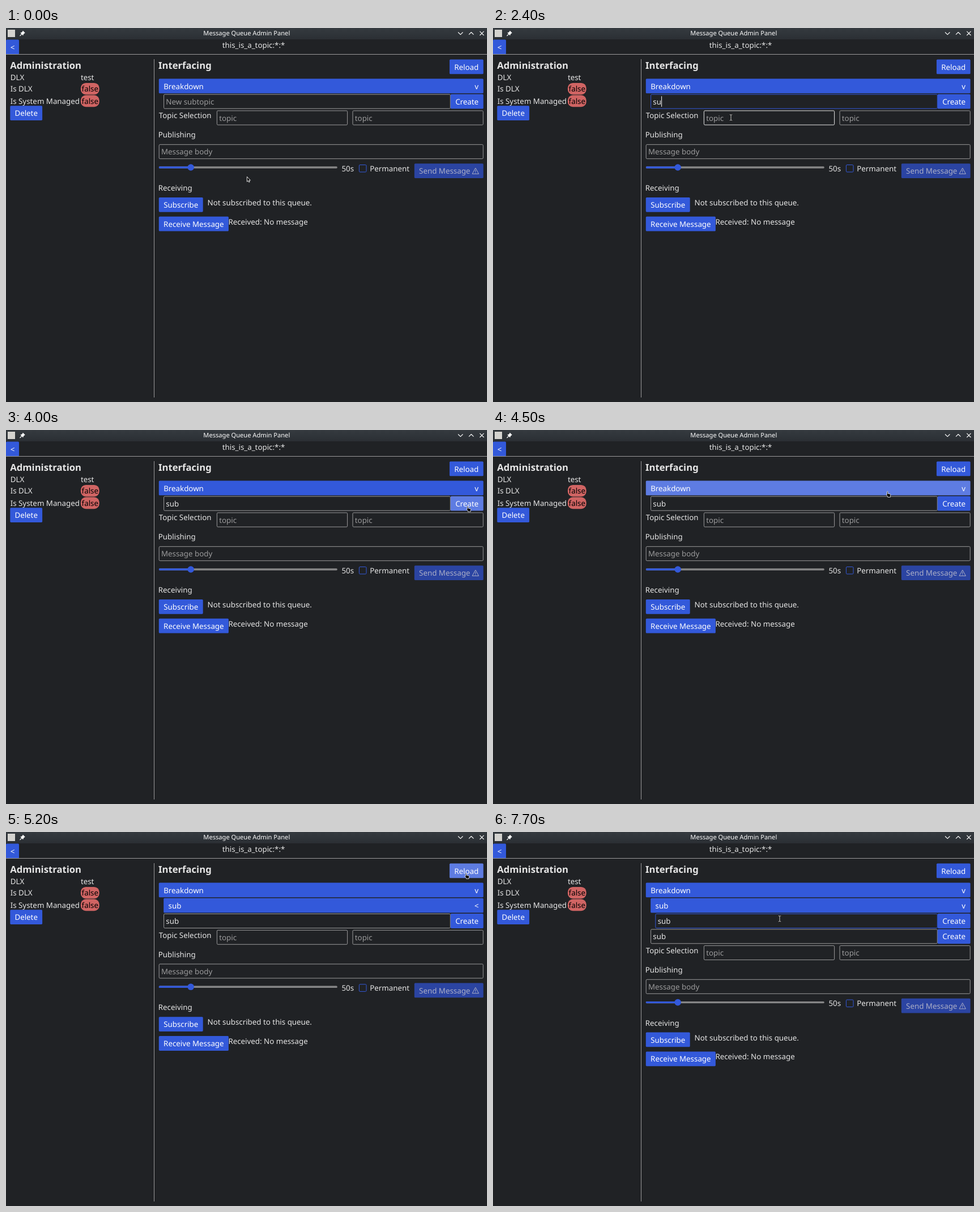
Recreate the animation shown at these times as an HTML page. Size 849x660 px, loop 8 s.

```html
<!DOCTYPE html>
<html lang="en">
<head>
<meta charset="utf-8">
<title>Message Queue Admin Panel</title>
<style>
  html, body { margin: 0; width: 100%; height: 100%; overflow: hidden; background: #202225; }
  svg { display: block; width: 849px; height: 660px; }
  text { font: 13.333px "Noto Sans", sans-serif; fill: #e6e6e6; text-rendering: geometricPrecision; white-space: pre; }
  text.title { font-size: 11.11px; fill: #fcfcfc; }
  text.head { font-size: 16.667px; font-weight: 700; }
  text.on { fill: #fff; }
  text.off { fill: #abaec6; }
  text.hint { fill: #9a9a9b; }
  text.dark { fill: #000; }
</style>
</head>
<body>
<svg id="stage" viewBox="0 0 849 660"></svg>
<script>
const LOOP = 8000, STEP = 100;
const BLUE = '#3359da', LIGHT = '#5e7ce2', GREY = '#9a9a9b', BG = '#202225';
const LEFT = 269.8, RIGHT = 842.6, ROW_H = 25.8, PITCH = 27.3;
const CREATE_X = 784.7;

// Pointer path: time, x, y
const PATH = [
  [100, 425, 262], [700, 368.5, 122], [1500, 368.5, 122], [1800, 420, 158],
  [2900, 420, 158], [3000, 470, 165], [3200, 640, 178], [3400, 812, 148],
  [3700, 815, 134], [4300, 815, 134], [4500, 696.3, 108.3], [4800, 740, 95],
  [5100, 812, 72.3], [5300, 812, 72.3], [5800, 588.4, 127], [6600, 588.4, 127],
  [7100, 506, 153]
];

function pointerAt(t) {
  let a = PATH[0];
  for (const b of PATH) {
    if (t < b[0]) {
      const k = Math.max(0, (t - a[0]) / (b[0] - a[0] || 1));
      return { x: a[1] + (b[1] - a[1]) * k, y: a[2] + (b[2] - a[2]) * k };
    }
    a = b;
  }
  return { x: a[1], y: a[2] };
}

const rect = (x, y, w, h, fill, r = 1.67, extra = '') =>
  `<rect x="${x}" y="${y}" width="${w}" height="${h}" rx="${r}" fill="${fill}" ${extra}/>`;
const path = (d, stroke, w = 1, fill = 'none') =>
  `<path d="${d}" stroke="${stroke}" stroke-width="${w}" fill="${fill}" stroke-linejoin="round"/>`;
const text = (x, y, s, cls = '', anchor = 'start') =>
  `<text x="${x}" y="${y}" class="${cls}" text-anchor="${anchor}">${s.replace('<', '&lt;')}</text>`;

let mouse, shape, pressed;

function over(x, y, w, h, kind) {
  const hit = mouse.x >= x && mouse.x < x + w && mouse.y >= y && mouse.y < y + h;
  if (hit) shape = kind;
  return hit;
}

function button(x, y, w, label) {
  const hot = over(x, y, w, ROW_H, 'hand') && !pressed;
  return rect(x, y, w, ROW_H, hot ? LIGHT : BLUE) + text(x + w / 2, y + 18, label, 'on', 'middle');
}

function bar(x, y, label, mark) {
  const w = RIGHT - x, hot = over(x, y, w, ROW_H, 'hand');
  return rect(x, y, w, ROW_H, hot ? LIGHT : BLUE) +
    text(x + 8.33, y + 18, label, 'on') + text(830.6, y + 18, mark, 'on', 'middle');
}

function input(x, y, w, value, hint, focused, caret) {
  const hot = over(x, y, w, ROW_H, 'beam');
  const line = focused ? BLUE : hot ? '#e6e6e6' : GREY;
  let out = rect(x + .4, y + .4, w - .8, ROW_H - .8, BG, 1.67, `stroke="${line}" stroke-width="1"`);
  out += text(x + 4.17, y + 18, value || hint, value ? '' : 'hint');
  if (caret) {
    const widths = { s: 6.39, u: 8.24, b: 8.2 };
    const end = [...value].reduce((sum, c) => sum + widths[c], x + 4.17);
    out += rect(end, y + 3.6, 1.1, 18.6, '#e6e6e6', 0);
  }
  return out;
}

function subtopic(x, y, value, focused, caret) {
  return input(x, y, CREATE_X - x, value, 'New subtopic', focused, caret) +
    button(CREATE_X, y, RIGHT - CREATE_X, 'Create');
}

function frameParts() {
  const pill = y => rect(131.9, y, 32.8, 20.7, '#d06463', 9) + text(133.6, y + 15.4, 'false', 'dark');
  return rect(0, 0, 849, 20, 'url(#bar)', 0) +
    rect(3, 3, 13, 13, '#d4d3cf', 0) +
    path('M24.5 14L28 10.5', '#fcfcfc', 1.1) +
    path('M29.8 5L33.4 8.6L32.4 9.2L30.6 11L30 13L25.6 8.6L27.6 8L29.4 6.2Z', '#fcfcfc', .5, '#fcfcfc') +
    text(424.8, 13.2, 'Message Queue Admin Panel', 'title', 'middle') +
    path('M798 7.5L802.2 11.7L806.4 7.5M817 11.7L821.2 7.5L825.4 11.7M836.3 5.8L843.5 13M843.5 5.8L836.3 13', '#fcfcfc', 1.1) +
    button(0, 20.5, 23, '<') +
    text(437, 34.6, 'this_is_a_topic:*:*', '', 'middle') +
    rect(0, 46, 849, 1, GREY, 0) + rect(261, 55, 1, 597, GREY, 0) +
    text(7.2, 72, 'Administration', 'head') +
    text(7.7, 92.3, 'DLX') + text(131.9, 92.3, 'test') +
    text(7.7, 112.3, 'Is DLX') + pill(96.9) +
    text(7.7, 133.9, 'Is System Managed') + pill(118.5) +
    button(7.3, 137.2, 56.8, 'Delete') +
    text(269, 72, 'Interfacing', 'head') +
    button(782.9, 55.5, RIGHT - 782.9, 'Reload');
}

function lowerParts(d) {
  return text(269.8, 159.4 + d, 'Topic Selection') +
    input(372, 145.6 + d, 231, '', 'topic') +
    input(611.6, 145.6 + d, 231, '', 'topic') +
    text(268.8, 193.2 + d, 'Publishing') +
    input(LEFT, 205.3 + d, RIGHT - LEFT, '', 'Message body') +
    rect(LEFT, 244.3 + d, 315, 3.4, '#868687', 1.6) +
    rect(LEFT, 244.3 + d, 56, 3.4, BLUE, 1.6) +
    `<circle cx="326.2" cy="${246 + d}" r="5.8" fill="${BLUE}"/>` +
    text(592.5, 252.7 + d, '50s') +
    rect(623.4, 241.5 + d, 12.6, 12.6, BG, 1.5, `stroke="${BLUE}" stroke-width="1"`) +
    text(642.2, 252.7 + d, 'Permanent') +
    rect(720.8, 239.2 + d, RIGHT - 720.8, ROW_H, '#2b44a2') +
    text(729.1, 257.2 + d, 'Send Message', 'off') +
    path(`M823 ${257.4 + d}L828.7 ${247 + d}L834.4 ${257.4 + d}ZM828.7 ${250.4 + d}v3.6m0 1v1.2`, '#abaec6') +
    text(268.8, 287 + d, 'Receiving') +
    button(LEFT, 298.9 + d, 77.9, 'Subscribe') +
    text(355.6, 312.9 + d, 'Not subscribed to this queue.') +
    button(LEFT, 332.8 + d, 123.1, 'Receive Message') +
    text(392.4, 346.7 + d, 'Received: No message');
}

function pointer() {
  const marks = {
    arrow: path('M.4 .4V9.2L2.4 7.4L3.8 10.2L5.2 9.5L3.8 6.9H6.4Z', '#fff', .9, '#000'),
    beam: path('M-2.2 -5H-.6L0 -4.4L.6 -5H2.2M0 -4.4V4.4M-2.2 5H-.6L0 4.4L.6 5H2.2', '#000', 2.4) +
      path('M-2.2 -5H-.6L0 -4.4L.6 -5H2.2M0 -4.4V4.4M-2.2 5H-.6L0 4.4L.6 5H2.2', '#eee', 1),
    hand: path('M-.9 .6Q0 -.6 .9 .6V4L4.6 4.8Q5.6 5.1 5.5 6.2L5 8.4V10.2H.4V9L-1.9 6.4Q-2.3 5.2 -.9 5.6Z', '#fff', .8, '#000')
  };
  return `<g transform="translate(${mouse.x} ${mouse.y})">${marks[shape]}</g>`;
}

function draw(t) {
  mouse = pointerAt(t);
  shape = 'arrow';
  pressed = t === 3900;

  const focusOuter = t >= 1300 && t < 3900, focusInner = t >= 7200;
  const typed = t < 2300 ? '' : 'sub'.slice(0, (t - 2200) / 100);
  const hasSub = t >= 5200, open = t >= 6000;
  // The caret blinks every 500 ms, counted from the last click or key
  const since = t - (focusInner ? 7200 : t >= 2500 ? 2500 : t >= 2300 ? t : 1300);
  const lit = Math.floor(since / 500) % 2 === 0;

  const rowY = n => 89.5 + PITCH * n;
  const shift = hasSub + open;
  let out = '<defs><linearGradient id="bar" x2="0" y2="1"><stop stop-color="#353a3f"/>' +
    '<stop offset="1" stop-color="#2b2f34"/></linearGradient></defs>' + rect(0, 0, 849, 660, BG, 0);
  out += frameParts() + bar(LEFT, rowY(0), 'Breakdown', 'v');
  if (hasSub) out += bar(278.2, rowY(1), 'sub', open ? 'v' : '<');
  if (open) out += subtopic(286.5, rowY(2), typed, focusInner, focusInner && lit);
  out += subtopic(278.2, rowY(1 + shift), typed, focusOuter, focusOuter && lit);
  out += lowerParts(PITCH * shift) + pointer();
  document.getElementById('stage').innerHTML = out;
}

let last = -1;
const start = performance.now();
function tick() {
  const t = Math.floor(((performance.now() - start) % LOOP) / STEP) * STEP;
  if (t !== last) draw(last = t);
  requestAnimationFrame(tick);
}
tick();
</script>
</body>
</html>
```
